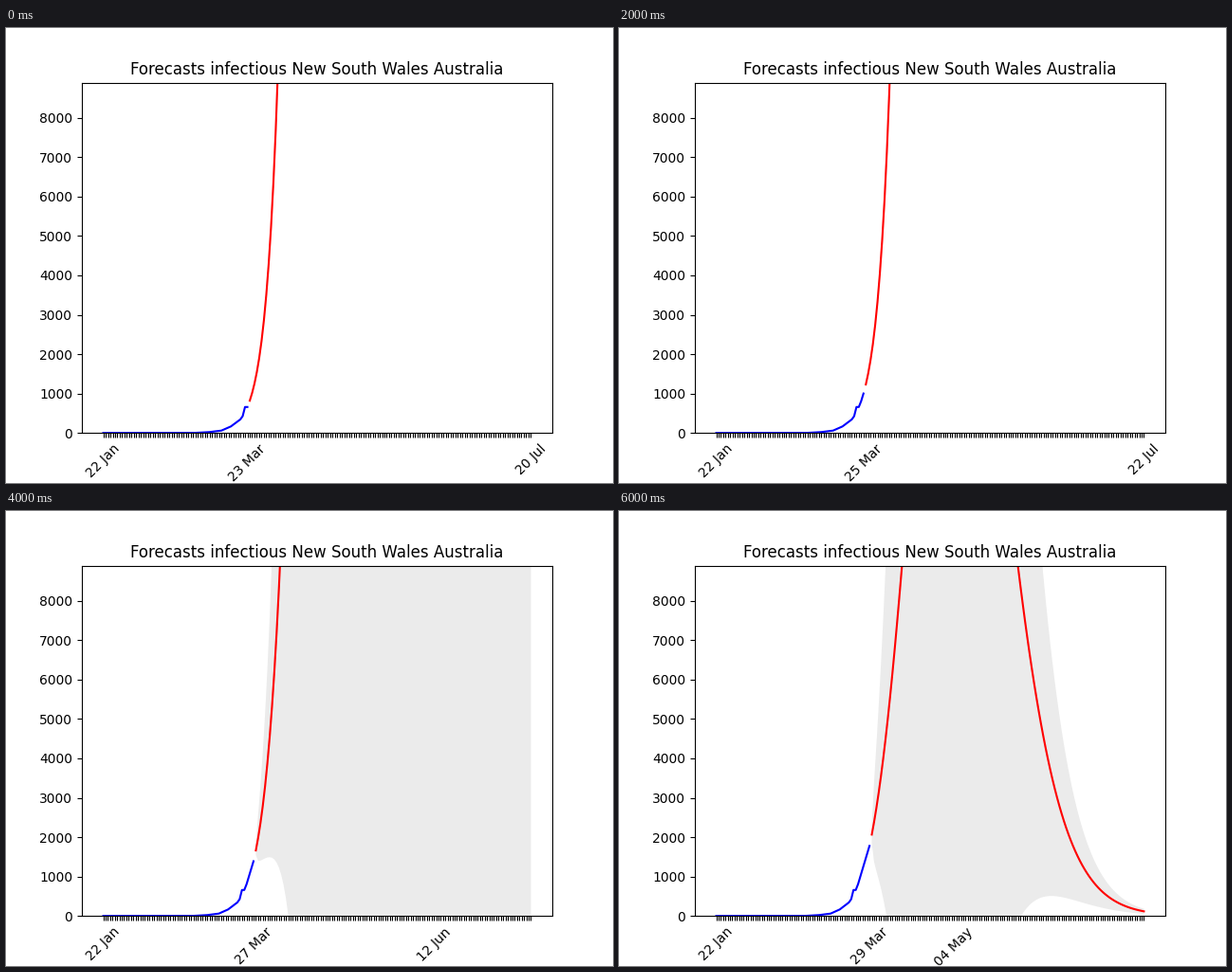
Write a matplotlib script that moves like this. It is 640 by 480 pixels and loops after 7 s.

```python
import numpy as np
import matplotlib.pyplot as plt
from matplotlib.animation import FuncAnimation

HORIZON = 120
FIRST_LAST = 61  # day index of the first run's latest observation
RUNS = 7
FALLOFF = 0.86   # log ratio of the initial to the peak transmission rate

# observed curve through a few (day, count) points
KNOTS = [(0, 0), (39, 3), (45, 23), (50, 60), (54, 165), (58, 343),
         (59, 426), (60, 659), (61, 659), (62, 807), (67, 1779)]
days = np.arange(FIRST_LAST + RUNS)
observed = np.interp(days, *zip(*KNOTS))
Y_MAX = 5 * observed[-1]

# per run: daily growth at the start, days until the peak
MODELS = [(0.2175, 150), (0.1966, 180), (0.2064, 150), (0.1927, 113),
          (0.1811, 78), (0.1702, 56.7), (0.1523, 37.1)]
# per run: days until the band reaches zero, day it leaves zero again
BANDS = {4: (14.1, np.inf), 5: (7.5, np.inf), 6: (6.5, 66.3)}

MONTHS = {"Jan": 31, "Feb": 29, "Mar": 31, "Apr": 30,
          "May": 31, "Jun": 30, "Jul": 31}


def date_label(index):
    day = 22 + index
    for month, length in MONTHS.items():
        if day <= length:
            return f"{day:02d} {month}"
        day -= length


def forecast(start, growth, peak, t):
    """Growth rate falls exponentially and crosses zero at the peak."""
    decay = FALLOFF / peak
    removal = growth / np.expm1(FALLOFF)
    gained = np.exp(FALLOFF) * -np.expm1(-decay * t) / decay
    return start * np.exp(removal * (gained - t))


def draw_band(run, x, t, mean):
    style = dict(color="#ebebeb", linewidth=0)
    if run == 3:
        ax.fill_between([137.5, x[-1]], 0, Y_MAX, **style)
    elif run in BANDS:
        opening, closing = BANDS[run]
        ratio = ((t - 0.95) / opening) ** 0.47
        ratio = np.minimum(ratio, np.exp(0.0115 * (closing - t)))
        ax.fill_between(x, mean * (1 - ratio), mean * (1 + ratio), **style)


fig, ax = plt.subplots(figsize=(6.4, 4.8), dpi=100)


def draw(run):
    ax.clear()
    last = FIRST_LAST + run
    end = last + HORIZON
    growth, peak = MODELS[run]
    t = np.arange(1, HORIZON + 1)
    x = last + t
    mean = forecast(observed[last], growth, peak, t)

    ax.plot(days[:last + 1], observed[:last + 1], color="blue")
    ax.plot(x, mean, color="red")
    draw_band(run, x, t, mean)

    peak_tick = last + min(int(peak), HORIZON)
    labels = [""] * (end + 1)
    labels[0] = date_label(0)
    labels[last] = date_label(last)
    labels[peak_tick] = date_label(peak_tick - 1)
    ax.set_xticks(range(end + 1), labels, rotation=45)
    ax.set_xlim(-0.05 * end, 1.05 * end)
    ax.set_ylim(0, Y_MAX)
    ax.set_title("Forecasts infectious New South Wales Australia")
    return []


anim = FuncAnimation(fig, draw, frames=RUNS, init_func=lambda: [],
                     interval=1000, repeat=True, repeat_delay=0)
plt.show()
```
